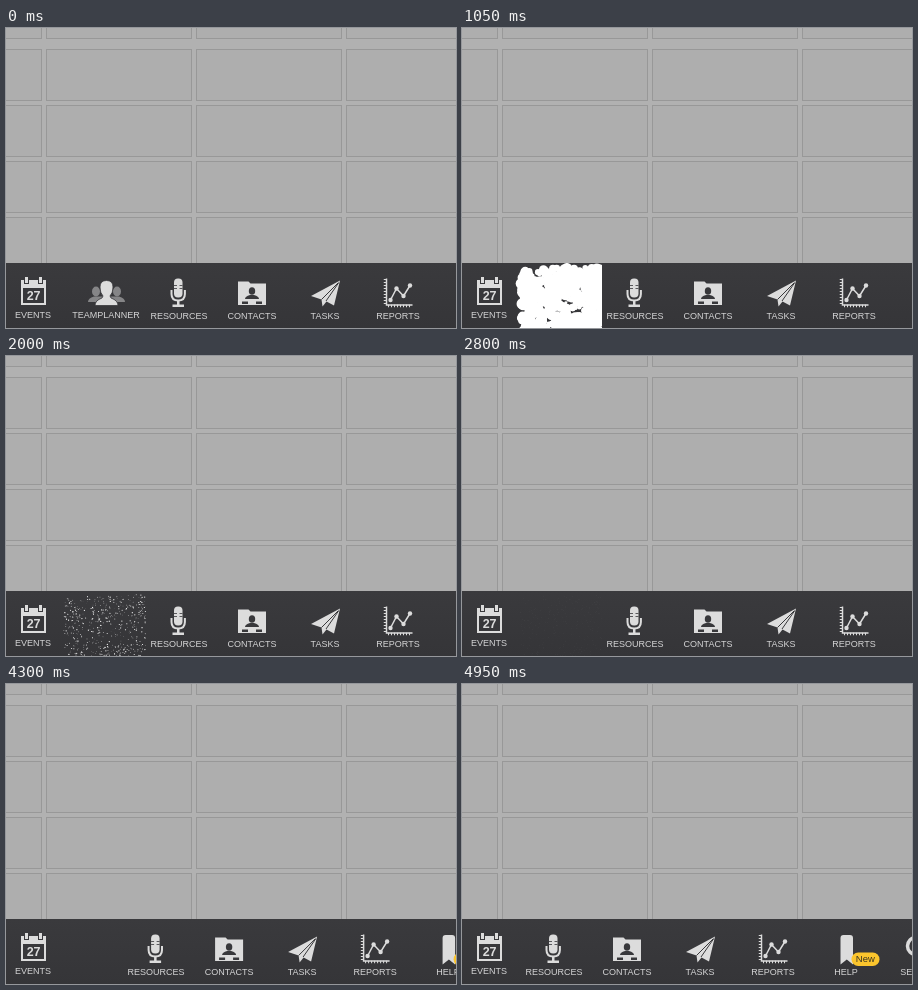
These frames come from a looping animation (450 by 300 pixels, 6.4 s). An HTML page with a canvas:

```html
<!DOCTYPE html>
<html lang="en">
<head>
<meta charset="utf-8">
<title>Toolbar</title>
<style>
html, body { margin: 0; width: 100%; height: 100%; overflow: hidden; background: #b1b1b1; }
svg, canvas { position: absolute; left: 0; top: 0; width: 450px; height: 300px; }
text { font-family: "Liberation Sans", Arial, sans-serif; text-anchor: middle; }
.label { font-size: 9px; fill: #d4d4d5; }
.cell { fill: #aeaeae; stroke: #989898; }
.icon { fill: #dcdcdc; }
.line { fill: none; stroke: #dcdcdc; }
.dark { fill: #38383b; }
.cut { fill: none; stroke: #38383b; }
</style>
</head>
<body>
<svg viewBox="0 0 450 300">
  <defs>
    <linearGradient id="bar" x1="0" y1="0" x2="0" y2="1">
      <stop offset="0" stop-color="#3a3a3d"/>
      <stop offset="1" stop-color="#353538"/>
    </linearGradient>
  </defs>
  <g id="cells"></g>
  <rect y="235" width="450" height="65" fill="url(#bar)"/>

  <g class="icon">
    <path fill-rule="evenodd" d="M15 252H40V277H15ZM17 260V275H38V260Z"/>
    <path class="dark" d="M18 249h5v7h-5zM32 249h5v7h-5z"/>
    <path d="M19 249h3v6h-3zM33 249h3v6h-3z"/>
    <text x="27.6" y="271.5" font-size="12.5" font-weight="bold">27</text>
    <text class="label" x="27" y="290">EVENTS</text>
  </g>

  <g id="team" class="icon">
    <g fill="#858587">
      <ellipse cx="90" cy="263.5" rx="4" ry="5"/>
      <ellipse cx="111" cy="263.5" rx="4" ry="5"/>
      <path d="M82 274q0-4 6-5.500h25q6 1.500 6 5.500z"/>
    </g>
    <path stroke="#38383b" stroke-width=".8" d="M89 277.500q0-5 7-7.500l1-2q-3-3-3-9 0-6.500 6.500-6.500t6.500 6.500q0 6-3 9l1 2q7 2.500 7 7.500z"/>
    <text class="label" x="100" y="290">TEAMPLANNER</text>
  </g>

  <g id="items" class="icon">
    <rect x="168" y="250.500" width="8.500" height="19" rx="4"/>
    <path class="cut" stroke-width=".8" d="M168 257.500h3M173.500 257.500h3M168 260.500h3M173.500 260.500h3"/>
    <path class="line" stroke-width="2" d="M165.500 262v4q0 6.500 6.700 6.500t6.700-6.500v-4"/>
    <path d="M171 272h2.500v4.500h4.500v2.500h-11.500v-2.500h4.500z"/>
    <text class="label" x="173" y="291">RESOURCES</text>

    <path d="M232 253.500h10.500l2 2h15.500v21.500h-28z"/>
    <ellipse class="dark" cx="246" cy="263" rx="3.200" ry="3.800"/>
    <path class="dark" d="M239 271q0-2.500 5-4h4q5 1.500 5 4zM236 273.500h6v2.500h-6zM250 273.500h6v2.500h-6z"/>
    <text class="label" x="246" y="291">CONTACTS</text>

    <path d="M334 252.500L328 277.500 320.500 273.500 316.500 278.500 315.500 271.500 305 268Z"/>
    <path class="cut" d="M332.500 254.500L315.500 271.500M332.500 255L320 273"/>
    <text class="label" x="319" y="291">TASKS</text>

    <path class="line" stroke-width="1.500" d="M380.500 250.500V277H406.500"/>
    <path class="line" stroke-width="2.500" stroke-dasharray="1 2" d="M379 251v25M382 278h24"/>
    <path class="line" stroke-width="1.500" d="M384.500 272l6-11.500 7 7.500 6.500-10.500"/>
    <g id="dots"></g>
    <text class="label" x="392" y="291">REPORTS</text>

    <path d="M459.500 254q0-3 3-3h6.500q3 0 3 3v26.500l-6.200-5-6.300 5z"/>
    <text class="label" x="465" y="291">HELP</text>
    <rect x="470.500" y="268.500" width="28" height="13.500" rx="6.700" fill="#fbc52d"/>
    <text x="484.300" y="278.400" font-size="9.500" fill="#3a3420">New</text>

    <circle class="line" stroke-width="3.500" cx="535" cy="262" r="8.500"/>
    <path class="line" stroke-width="4.500" d="M541 268l8 9"/>
    <text class="label" x="538" y="291">SEARCH</text>
  </g>
</svg>
<canvas id="dust" width="450" height="300"></canvas>
<script>
const LOOP = 6400, BURST = 950, BURST_END = 2850;
const SLIDE = 3925, SLIDE_MS = 1000, SHIFT = 81;
const $ = id => document.getElementById(id);
const ctx = $("dust").getContext("2d");

function add(parent, tag, attrs) {
  const el = document.createElementNS("http://www.w3.org/2000/svg", tag);
  for (const key in attrs) el.setAttribute(key, attrs[key]);
  parent.append(el);
}

for (let row = 0; row < 5; row++)
  for (let col = 0; col < 4; col++)
    add($("cells"), "rect", {
      class: "cell", x: col * 150 - 109.5, width: 145,
      y: row ? row * 56 - 34.5 : -40.5, height: 51
    });

for (const [cx, cy] of [[384.5, 272], [390.5, 260.5], [397.5, 268], [404, 257.5]])
  add($("dots"), "circle", { cx, cy, r: 2.2 });

let seed = 27;
function rand() {
  seed = (seed * 16807) % 2147483647;
  return seed / 2147483647;
}

const specks = Array.from({ length: 530 }, () => ({
  x: 59 + rand() * 82,
  y: 239.5 + rand() * 62,
  size: 0.4 + rand() * 1.2,
  phase: rand() * Math.PI * 2
}));

function drawDust(t) {
  ctx.clearRect(0, 0, 450, 300);
  if (t < BURST || t >= BURST_END) return;
  const age = t - BURST;
  const radius = 4.3 * Math.exp(-age / 435);
  const drift = Math.min(1.5, age / 300);
  ctx.save();
  ctx.beginPath();
  ctx.rect(51, 235, 89, 65);
  ctx.clip();
  ctx.fillStyle = "#fff";
  for (const p of specks) {
    ctx.beginPath();
    ctx.arc(p.x + drift * Math.cos(p.phase), p.y + drift * Math.sin(p.phase),
      radius * p.size, 0, Math.PI * 2);
    ctx.fill();
  }
  ctx.restore();
}

const ease = p => p < 0.5 ? 2 * p * p : 1 - 2 * (1 - p) ** 2;

function frame() {
  const t = performance.now() % LOOP;
  const p = Math.min(1, Math.max(0, (t - SLIDE) / SLIDE_MS));
  $("items").setAttribute("transform", `translate(${-SHIFT * ease(p)} 0)`);
  $("team").style.visibility = t < BURST ? "visible" : "hidden";
  drawDust(t);
  requestAnimationFrame(frame);
}
frame();
</script>
</body>
</html>
```
